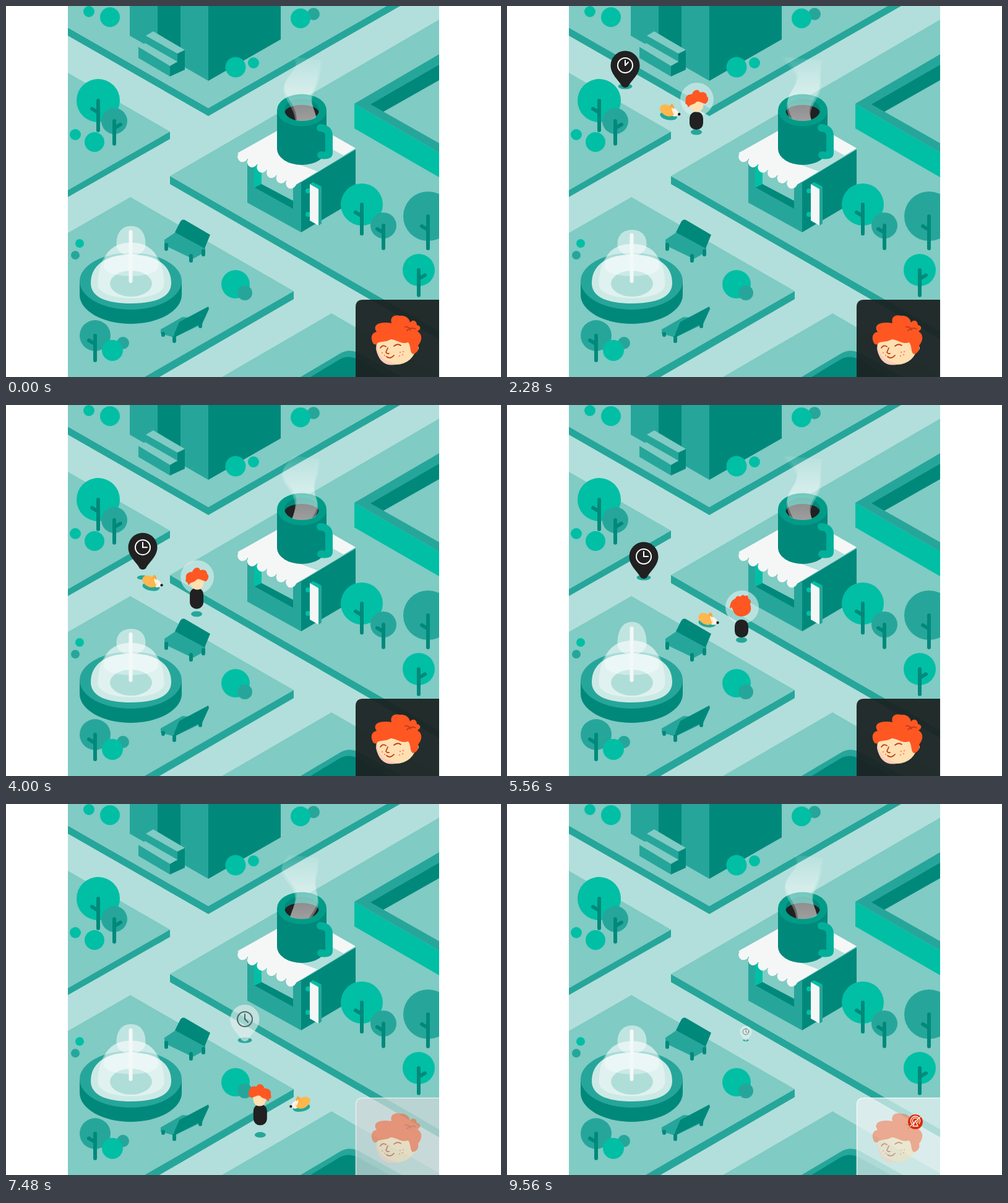
These frames come from a looping animation (800x600 px, 9600 ms). An HTML page:

```html
<!DOCTYPE html>
<html lang="en">
<head>
<meta charset="utf-8">
<title>Walk</title>
<style>
html, body { margin: 0; width: 100%; height: 100%; overflow: hidden; background: #fff; }
svg { display: block; width: 800px; height: 600px; }
.road { fill: #b2dfdb; }
.grass { fill: #80cbc4; }
.teal { fill: #26a69a; }
.dark { fill: #00897b; }
.lime { fill: #00bfa5; }
.white { fill: #f5f7f7; }
.orange { fill: #ff5722; }
.cream { fill: #ffe0b2; }
.black { fill: #212121; }
.line { fill: none; stroke-linecap: round; stroke-linejoin: round; }
</style>
</head>
<body>
<svg viewBox="0 0 800 600">
<defs>
  <clipPath id="stage"><rect x="100" width="600" height="600"/></clipPath>
  <clipPath id="roof"><path d="M384 234L477 180L565 230L468 290Z"/></clipPath>
  <clipPath id="cup"><ellipse cx="478" cy="168" rx="28" ry="18"/></clipPath>
  <clipPath id="vapour"><rect x="440" y="70" width="80" height="103"/><ellipse cx="478" cy="173" rx="27" ry="13"/></clipPath>
  <linearGradient id="fog" gradientUnits="userSpaceOnUse" x1="0" y1="186" x2="0" y2="82">
    <stop offset="0" stop-color="#fff" stop-opacity=".34"/>
    <stop offset=".5" stop-color="#fff" stop-opacity=".24"/>
    <stop offset="1" stop-color="#fff" stop-opacity=".04"/>
  </linearGradient>
</defs>
<g clip-path="url(#stage)">
  <rect class="road" x="100" width="600" height="600"/>

  <!-- lawns -->
  <path class="teal" d="M100 35L327 165L615 0H637L327 178L100 48Z"/>
  <path class="grass" d="M100 0H615L327 165L100 35Z"/>
  <path class="teal" d="M265 203V215L100 309V297Z"/>
  <path class="grass" d="M100 108L265 203L100 298Z"/>
  <path class="teal" d="M265 275V288L700 539V526Z"/>
  <path class="grass" d="M265 275L700 22V526Z"/>
  <path class="teal" d="M465 461V474L248 600H223Z"/>
  <path class="grass" d="M201 309L465 461L224 600H100V367Z"/>
  <path class="grass" d="M526 497L705 600H349Z"/>
  <path class="teal" d="M476 600L540 562Q553 554 568 560L640 600Z"/>
  <path class="dark" d="M492 600L540 571Q553 564 568 571L620 600Z"/>

  <!-- building -->
  <path class="teal" d="M200 0H327V121L200 48Z"/>
  <path class="dark" d="M245 0H282V95L245 74Z"/>
  <path class="dark" d="M327 0H444V54L327 121Z"/>
  <path class="dark" d="M289 71V103L265 114V96L277 90V77Z"/>
  <path class="teal" d="M226 48L277 77V92L226 62ZM214 66L265 96V114L214 84Z"/>
  <path class="grass" d="M238 41L289 71L277 77L226 48ZM225 60L277 90L265 97L214 66Z"/>

  <!-- walled yard -->
  <path class="lime" d="M563 158L700 237V277L563 198Z"/>
  <path class="teal" d="M563 158L700 78V237Z"/>
  <path class="dark" d="M589 159L700 95V222Z"/>
  <path class="grass" d="M610 171L700 120V222Z"/>

  <!-- kiosk -->
  <path class="teal" d="M390 240L477 285V366L390 318Z"/>
  <path class="dark" d="M477 285L565 232V314L477 366Z"/>
  <path class="dark" d="M401 250L464 284V328L401 293Z"/>
  <path class="lime" d="M401 250L413 256V288L401 294Z"/>
  <path class="grass" d="M413 256L464 284V315L413 288Z"/>
  <path class="white" d="M374 238L477 180L565 230L467 290Z"/>
  <path class="road" clip-path="url(#roof)" d="M470 255L505 268L548 243L528 232Z"/>
  <g id="awning" class="white"></g>
  <g class="lime"><circle cx="488" cy="299" r="4"/><circle cx="488" cy="337" r="4"/><path d="M491 288L496 285L510 292L505 296Z"/></g>
  <path class="teal" d="M505 296L510 292V352L505 355Z"/>
  <path class="white" d="M491 288L505 296V355L491 347Z"/>

  <!-- mug -->
  <path class="dark" d="M438 169H518V231A40 26 0 0 1 438 231Z"/>
  <path class="line" d="M508 197Q522 198 522 210V238Q522 243 509 241" stroke="#00b09a" stroke-width="12"/>
  <ellipse cx="478" cy="168.500" rx="40" ry="26" fill="#009c88"/>
  <g clip-path="url(#cup)"><rect class="dark" x="445" y="145" width="70" height="45"/><ellipse class="black" cx="478" cy="173" rx="28" ry="13"/></g>
  <g clip-path="url(#vapour)" fill="url(#fog)"><path id="steam1"/><path id="steam2"/></g>

  <!-- fountain -->
  <path class="dark" d="M119 445V467A82.500 47 0 0 0 284 467V445Z"/>
  <ellipse class="teal" cx="201.500" cy="445" rx="82.500" ry="46"/>
  <path d="M137 448C137 420 160 402 202 402S267 420 267 448C267 471 242 481 202 481S137 471 137 448Z" fill="#cce9e6"/>
  <g fill="#fff">
    <path id="dome1" opacity=".38"/>
    <ellipse cx="202" cy="449" rx="34" ry="21" fill="#80cbc4" opacity=".5"/>
    <path id="dome2" opacity=".35"/><path id="dome3" opacity=".5"/>
  </g>
  <path id="jet" class="line" stroke="#f3f8f8" stroke-width="6"/>

  <!-- benches -->
  <path class="teal" d="M256 378L274 366L322 391V398L302 409L256 387Z"/>
  <path class="dark" d="M281 350Q284 344 289 346L330 370L321 392L273 366Z"/>
  <path class="line" d="M259 386V393M299 404V412M319 396V402" stroke="#00897b" stroke-width="6"/>
  <path class="teal" d="M250 523L285 503L318 505V514L272 536L250 530Z"/>
  <path class="dark" d="M272 530L280 511L327 486L328 490L318 512L272 536Z"/>
  <path class="line" d="M254 530V532M272 536V542M314 513V518" stroke="#00897b" stroke-width="6"/>

  <g id="plants"></g>

  <!-- actors -->
  <g id="pin">
    <ellipse id="pinShade" class="teal" rx="11.500" ry="4.500"/>
    <g id="pinBody">
      <path id="drop" d="M-5 0C-10 -10 -23.500 -19 -23.500 -34A23.500 23.500 0 0 1 23.500 -34C23.500 -19 10 -10 5 0Q0 4 -5 0Z"/>
      <g id="clock" class="line" stroke-width="2"><circle cy="-34" r="12"/><path d="M0 -42V-34"/><path id="hour" d="M0 -34V-41"/></g>
    </g>
  </g>
  <g id="dog">
    <ellipse class="teal" cx="-1" cy="-2" rx="14" ry="6.500" transform="rotate(10)"/>
    <g id="dogBody">
      <ellipse cx="8" cy="-6" rx="8" ry="6" transform="rotate(30 8 -6)" fill="#fff3e6"/>
      <ellipse cx="-3" cy="-9" rx="12.500" ry="8.500" transform="rotate(30 -3 -9)" fill="#ffb74d"/>
      <path d="M1 -14Q3 -21 6 -19Q10 -14 7 -11Z" fill="#ffa63d"/>
      <path d="M4 -14Q10 -12 8 -3Q5 -7 4 -14Z" fill="#fff3e6"/>
      <circle class="black" cx="16.500" cy="-3" r="2.200"/>
    </g>
  </g>
  <g id="man">
    <ellipse class="teal" rx="9" ry="4.500"/>
    <g id="manBody">
      <circle id="bubble" cx="1" cy="-53" r="27" fill="#e0f2f1"/>
      <rect id="coat" class="black" x="-11" width="22" rx="10.500"/>
      <g id="front">
        <ellipse class="cream" cx="1" cy="-43.500" rx="10.500" ry="11"/>
        <path class="orange" d="M-17 -51C-19 -58 -12 -62 -7 -61C-6 -67 3 -72 6 -64C12 -66 17 -63 17 -58C21 -55 19 -49 15 -46C8 -47 5 -51 0 -49C-3 -44 -9 -46 -13 -40C-15 -43 -14 -45 -17 -45C-18 -47 -18 -49 -17 -51Z"/>
      </g>
      <path id="back" class="orange" d="M-16 -53Q-21 -48 -18 -57Q-17 -64 -10 -67Q-8 -73 -2 -70Q2 -75 6 -71Q11 -74 11 -67Q17 -64 14 -58Q17 -50 13 -44Q7 -38 -1 -38Q-12 -39 -14 -49Z"/>
    </g>
  </g>

  <!-- contact card -->
  <path id="card" d="M565 600V487Q565 475 577 475H700V600Z"/>
  <path id="cardEdge" class="line" d="M565.500 600V487Q565.500 475.500 577 475.500H700" stroke="#fff" stroke-width="1.500"/>
  <g id="face">
    <ellipse class="cream" cx="630.500" cy="551" rx="32" ry="29"/>
    <path d="M599 545Q601 575 634 579Q605 587 598 555Z" fill="#ffccbc"/>
    <circle class="cream" cx="662" cy="553" r="5"/>
    <g fill="#ff8a65"><circle cx="637" cy="560" r="1.200"/><circle cx="642" cy="559" r="1.200"/><circle cx="641" cy="564" r="1.200"/><circle cx="636" cy="566" r="1.200"/><circle cx="608" cy="561" r="1.200"/><circle cx="612" cy="565" r="1.200"/></g>
    <path class="line" stroke="#c63c1c" stroke-width="1.800" d="M605 553Q609 547 614 551M627 550Q633 545 638 549M617 553L614 560Q616 563 619 562M615 567Q621 572 627 565"/>
    <path class="orange" d="M593 545C588 535 592 528 599 527C592 518 600 509 623 513C620 503 628 498 637 501C645 500 652 505 653 512C657 506 664 509 664 516C671 517 671 523 665 526C676 533 670 545 666 549C668 557 663 562 657 563C652 558 655 551 650 544C640 548 632 540 622 539C613 545 602 541 599 547C596 548 594 547 593 545Z"/>
    <path class="line" stroke="#c63c1c" stroke-width="1.800" d="M645 519Q651 518 654 524M648 525Q654 519 662 522"/>
  </g>
  <g id="alert">
    <circle r="12" fill="#dd2c00"/>
    <g class="line" stroke="#fff" stroke-width="1.300"><path d="M0 -2L-4 7H4ZM-3.500 1A4.500 4.500 0 1 1 3.500 1M-6 3A7.500 7.500 0 1 1 6 3M-8 7L8 -8"/></g>
  </g>
</g>
</svg>
<script>
const LOOP = 9600, TAU = Math.PI * 2;
const $ = id => document.getElementById(id);
const set = (id, attrs) => { for (const k in attrs) $(id).setAttribute(k, attrs[k]); };
const ramp = (t, a, b) => Math.min(1, Math.max(0, (t - a) / (b - a)));
const mix = (a, b, p) => a.map((v, i) => v + (b[i] - v) * p);
const rgba = c => `rgba(${c.slice(0, 3).map(Math.round)},${c[3]})`;

// Plants: x, y, radius, class, branch side (0 = bush)
const plants = [
  [134, 9, 9, 'lime', 0], [168, 18, 16, 'lime', 0], [371, 99, 16.5, 'lime', 0], [400, 92, 9, 'lime', 0],
  [497, 13, 10, 'teal', 0], [476, 20, 16, 'lime', 0],
  [149, 153, 35, 'lime', -1], [175, 186, 21, 'teal', 1], [112, 208, 9, 'lime', 0], [143, 220, 16, 'lime', 0],
  [575, 321, 34, 'lime', -1], [610, 355, 21, 'teal', -1], [682, 340, 40, 'teal', -1], [667, 427, 26, 'lime', 1],
  [119, 384, 7, 'lime', 0], [112, 403, 7, 'teal', 0], [371, 450, 23, 'lime', 0], [386, 464, 12, 'teal', 0],
  [144, 533, 25, 'teal', -1], [189, 545, 10, 'teal', 0], [172, 557, 17, 'lime', 0]
];
$('plants').innerHTML = plants.map(([x, y, r, cls, side]) => {
  const fork = y + r * 0.55, end = y + r * 0.8 + 20;
  const trunk = side ? `<path class="line" stroke="#00897b" stroke-width="6" d="M${x} ${y}V${end}M${x} ${fork}l${side * 10} -6"/>` : '';
  return `<circle class="${cls}" cx="${x}" cy="${y}" r="${r}"/>` + trunk;
}).join('');

$('awning').innerHTML = [0, 1, 2, 3, 4, 5].map(i => {
  const x = 383 + i * 15.6, y = 243 + i * 8.6;
  return `<ellipse cx="${x}" cy="${y}" rx="8.5" ry="9.5" transform="rotate(28 ${x} ${y})"/>`;
}).join('');

// Ground positions: time, x, y
const manPath = [[0, 60, 57], [1360, 222, 150], [2150, 306, 204], [2340, 306, 204], [3240, 229, 272], [3320, 221, 279],
  [4000, 308, 338], [4780, 379, 380], [5860, 379, 380], [6850, 488, 478], [7480, 411, 535], [8900, 211, 710]];
const dogPath = [[560, 60, 57], [1360, 160, 114], [2700, 308, 210], [2840, 308, 212], [3240, 275, 241], [3780, 219, 284],
  [4000, 235, 296], [4950, 324, 355], [5960, 324, 355], [7270, 494, 480], [7480, 477, 493], [8950, 290, 640]];
// Pins: x, y, appear, vanish, hour hand angle
const pins = [[191, 130, 1240, 2400, 45], [302, 205, 2600, 3560, 90], [221, 279, 3808, 5900, 90], [386, 382, 6100, 9466, 135]];

function walk(path, t) {
  let i = 0;
  while (i < path.length - 2 && t >= path[i + 1][0]) i++;
  const a = path[i], b = path[i + 1];
  const [, x, y] = mix(a, b, ramp(t, a[0], b[0]));
  return { x, y, left: b[1] < a[1], still: b[1] === a[1] };
}

function drawMan(t, lost) {
  const { x, y, left, still } = walk(manPath, t);
  const hop = still ? 0 : 14 * Math.abs(Math.sin(Math.PI * (t - 1180) / 360));
  const tall = 29 + 5 * Math.min(1, hop / 6);
  const away = t > 4780 && t < 5860;
  set('man', { transform: `translate(${x} ${y})` });
  set('manBody', { transform: `translate(0 ${-hop})` });
  set('coat', { y: -18.5 - tall / 2, height: tall });
  set('front', { transform: `scale(${left ? -1 : 1} 1)`, opacity: away ? 0 : 1 });
  set('back', { opacity: away ? 1 : 0 });
  set('bubble', { opacity: 0.6 * (1 - lost) });
}

function drawDog(t) {
  const { x, y, left, still } = walk(dogPath, t);
  const hop = still ? 0 : 2 * Math.abs(Math.sin(Math.PI * t / 240));
  set('dog', { transform: `translate(${x} ${y}) scale(${left ? -1 : 1} 1)` });
  set('dogBody', { transform: `translate(0 ${-hop})` });
}

function drawPin(t, lost) {
  const pin = pins.find(p => t >= p[2] && t < p[3] + 160);
  set('pin', { opacity: pin ? 1 : 0 });
  if (!pin) return;
  const [x, y, start, end, angle] = pin;
  const p = ramp(t, start, start + 240), height = 42 * (1 - p * p);
  const size = 1 - ramp(t, end, end + 160);
  set('pin', { transform: `translate(${x} ${y}) scale(${size})` });
  set('pinShade', { transform: `scale(${1 - height / 75})` });
  set('pinBody', { transform: `translate(0 ${-height})`, opacity: ramp(p, 0, 0.35) });
  set('drop', { fill: rgba(mix([33, 33, 33, 1], [232, 240, 239, 0.62], lost)) });
  set('clock', { stroke: rgba(mix([255, 255, 255, 1], [55, 71, 69, 0.8], lost)) });
  set('hour', { transform: `rotate(${angle} 0 -34)` });
}

function drawCard(t) {
  const p = ramp(t, 7120, 7540);
  set('card', { fill: rgba(mix([27, 35, 35, 0.94], [238, 245, 245, 0.68], p)) });
  set('cardEdge', { opacity: 0.7 * p });
  set('face', { opacity: 1 - 0.55 * p });
  set('alert', { transform: `translate(660 514) scale(${ramp(t, 8200, 8360)})` });
}

function dome(w, top, base, dip) {
  const l = 202 - w, r = 202 + w, h = base - top;
  return `M${l} ${base}C${l} ${base - h * 0.6} ${202 - w * 0.65} ${top} 202 ${top}S${r} ${base - h * 0.6} ${r} ${base}` +
    `C${r} ${base + dip} ${l} ${base + dip} ${l} ${base}Z`;
}

function drawFountain(t) {
  const s = Math.sin(TAU * (t + 12) / 600);
  set('dome1', { d: dome(53.5, 383 - 2 * s, 450, 30) });
  set('dome2', { d: dome(44, 383 - 2 * s, 421, 21) });
  set('dome3', { d: dome(23.5, 356.5 - 6 * s, 385, 25) });
  set('jet', { d: `M201.500 ${366 - 5 * s}V445` });
}

function plume(phase, width) {
  const left = [], right = [];
  for (let i = 0; i <= 20; i++) {
    const u = i / 20, y = 188 - u * 106;
    const mid = 478 + 4 * u + 7 * Math.cos(phase - u * 7);
    const half = width + 10 * u + 6 * u * Math.sin(phase - u * 9);
    left.push(`${mid - half} ${y}`);
    right.unshift(`${mid + half} ${y + 6 * u}`);
  }
  return 'M' + left.concat(right).join('L') + 'Z';
}

function drawSteam(t) {
  const phase = TAU * t / 3200;
  set('steam1', { d: plume(phase, 17) });
  set('steam2', { d: plume(phase + 0.3, 15) });
}

function draw(now) {
  const t = now % LOOP, lost = ramp(t, 7180, 7460);
  drawSteam(t);
  drawFountain(t);
  drawPin(t, lost);
  drawDog(t);
  drawMan(t, lost);
  drawCard(t);
}

const begin = performance.now();
(function tick() {
  draw(performance.now() - begin);
  requestAnimationFrame(tick);
})();
</script>
</body>
</html>
```
